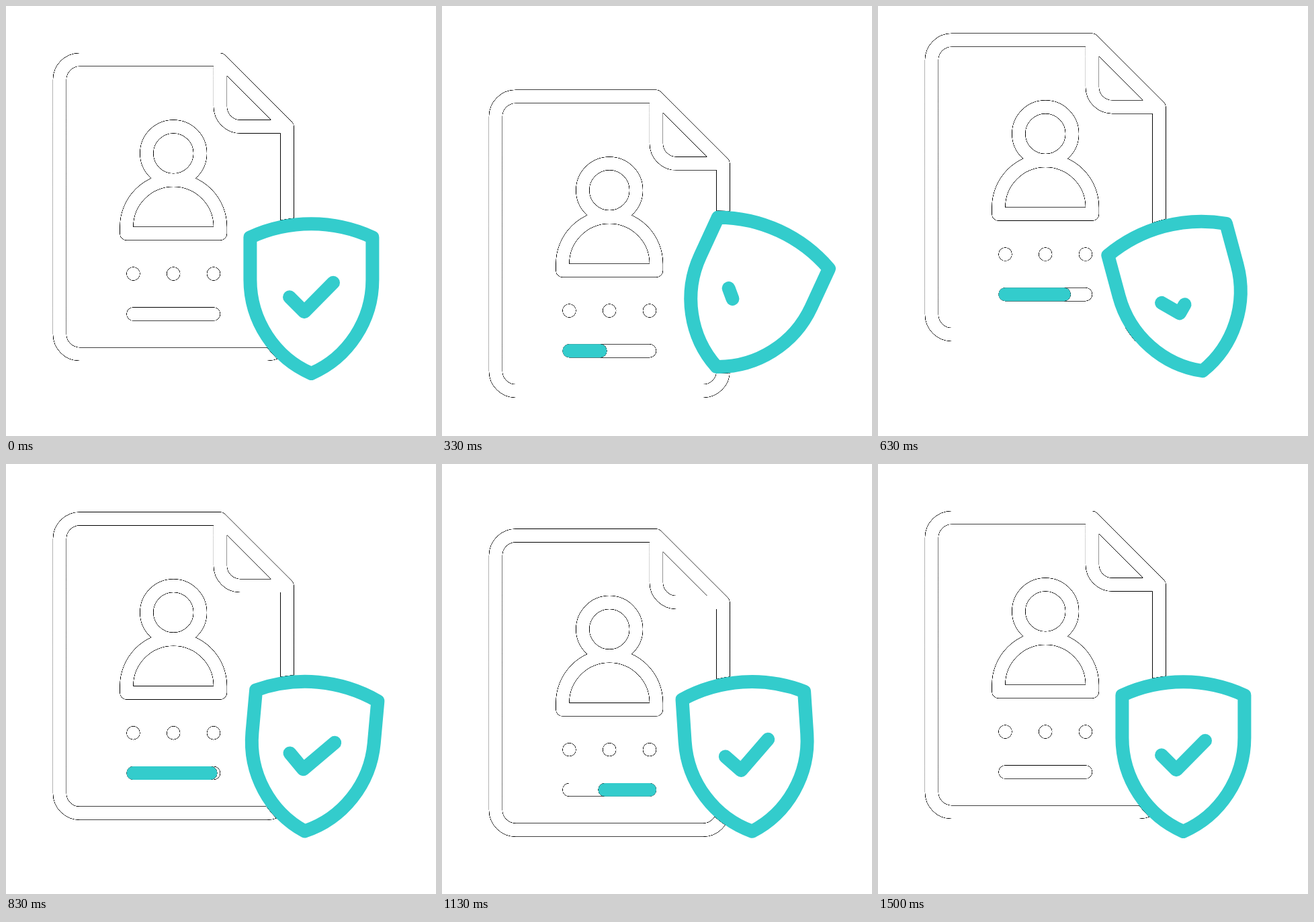
Recreate the animation shown at these times as an HTML page with a canvas. Size 640 by 640 pixels, loop 1670 ms.

```html
<!DOCTYPE html>
<html lang="en">
<head>
<meta charset="utf-8">
<title>Protected profile</title>
<style>
  html, body { margin: 0; width: 100%; height: 100%; overflow: hidden; background: #fff; }
  canvas { display: block; width: 640px; height: 640px; }
</style>
</head>
<body>
<canvas id="stage" width="640" height="640"></canvas>
<script>
const SIZE = 640, LOOP = 1670, FRAME = 100 / 3, LAST = 45;
const TEAL = '#33cccc';
const UNIT = 19.92, DOC_X = 249.2, DOC_Y = 69.9;
const PIVOT_X = 454.4, PIVOT_Y = 437.3;

const ctx = document.getElementById('stage').getContext('2d');
const layer = document.createElement('canvas');
layer.width = layer.height = SIZE;
const ink = layer.getContext('2d', { willReadFrequently: true });

// Document in grid units: x from its centre, y from its top edge
const doc = new Path2D(`
  M3.5 .5 L8.5 5.5 V21 A1.5 1.5 0 0 1 7 22.5 H-7 A1.5 1.5 0 0 1 -8.5 21
  V2 A1.5 1.5 0 0 1 -7 .5 Z
  M3.5 .5 V4 A1.5 1.5 0 0 0 5 5.5 H8.5
  M2 7.5 A2 2 0 1 1 -2 7.5 A2 2 0 1 1 2 7.5 Z
  M-3.5 13.5 V13 A3.5 3.5 0 0 1 3.5 13 V13.5 Z
  M-3 19.5 H3`);
const dots = new Path2D();
for (const x of [-3, 0, 3]) {
  dots.moveTo(x + .5, 16.5);
  dots.arc(x, 16.5, .5, 0, Math.PI * 2);
}

// Shield and tick, relative to the pivot
const shield = new Path2D(`
  M-91 -93 A217 217 0 0 1 91 -93 V-30
  C91 31 54.5 86 0 109.7 C-54.5 86 -91 31 -91 -30 Z`);
const tick = new Path2D('M-32.4 -4 L-10.4 18 L32.6 -25.5');
const TICK_LEN = Math.hypot(22, 22) + Math.hypot(43, 43.5);

// Keys are [frame, value] pairs joined with a smooth ease
const slide = [[0, 0], [11.5, 57.6], [19.7, -31], [31, 41], [38.5, 0]];
const swing = [[.7, 0], [12, 27], [20, -17], [26.5, 8.6], [34, -3.75], [45, 0]];
const trim = [[2, 1], [13, 0], [25, 1]];

function ease(keys, f) {
  if (f <= keys[0][0]) return keys[0][1];
  for (let i = 1; i < keys.length; i++) {
    const [f0, v0] = keys[i - 1], [f1, v1] = keys[i];
    if (f < f1) {
      const x = (f - f0) / (f1 - f0);
      return v0 + (v1 - v0) * x * x * (3 - 2 * x);
    }
  }
  return keys[keys.length - 1][1];
}

const clamp = x => Math.min(1, Math.max(0, x));

function place(c, width, color, pose) {
  c.save();
  pose(c);
  c.lineWidth = width;
  c.lineCap = c.lineJoin = 'round';
  c.strokeStyle = c.fillStyle = color;
}

// Half-covered edge pixels turn dark; empty and full ones stay white
function hairlines() {
  const img = ink.getImageData(0, 0, SIZE, SIZE), px = img.data;
  for (let i = 0; i < px.length; i += 4) {
    const a = px[i + 3] / 255;
    px[i] = px[i + 1] = px[i + 2] = 255 * (1 - 2 * a) ** 2;
    px[i + 3] = 255;
  }
  ctx.putImageData(img, 0, 0);
}

function draw(f) {
  const dy = ease(slide, f);
  const angle = ease(swing, f) * Math.PI / 180;
  const end = clamp(f / 26), start = clamp((f - 26) / 18);

  const onDoc = c => { c.translate(DOC_X, DOC_Y + dy); c.scale(UNIT, UNIT); };
  const onShield = c => { c.translate(PIVOT_X, PIVOT_Y); c.rotate(angle); };

  const bar = c => {
    if (end <= start) return;
    c.beginPath();
    c.moveTo(-3 + 6 * start, 19.5);
    c.lineTo(-3 + 6 * end, 19.5);
    c.stroke();
  };

  ink.clearRect(0, 0, SIZE, SIZE);
  place(ink, 1, '#fff', onDoc);
  ink.stroke(doc);
  ink.fill(dots);
  ink.globalCompositeOperation = 'destination-out';
  bar(ink);
  ink.restore();

  place(ink, 20, '#fff', onShield);
  ink.globalCompositeOperation = 'destination-out';
  ink.fill(shield);
  ink.stroke(shield);
  ink.restore();
  hairlines();

  place(ctx, 1, TEAL, onDoc);
  bar(ctx);
  ctx.restore();

  place(ctx, 20, TEAL, onShield);
  ctx.stroke(shield);
  const shown = ease(trim, f);
  if (shown > 0) {
    if (shown < 1) ctx.setLineDash([TICK_LEN * shown, TICK_LEN * 2]);
    ctx.stroke(tick);
  }
  ctx.restore();
}

let last = -1;
function run() {
  const ms = performance.now() % LOOP;
  const f = Math.min(LAST, Math.floor((ms + 3.4) / FRAME));
  if (f !== last) draw(last = f);
  requestAnimationFrame(run);
}
run();
</script>
</body>
</html>
```
